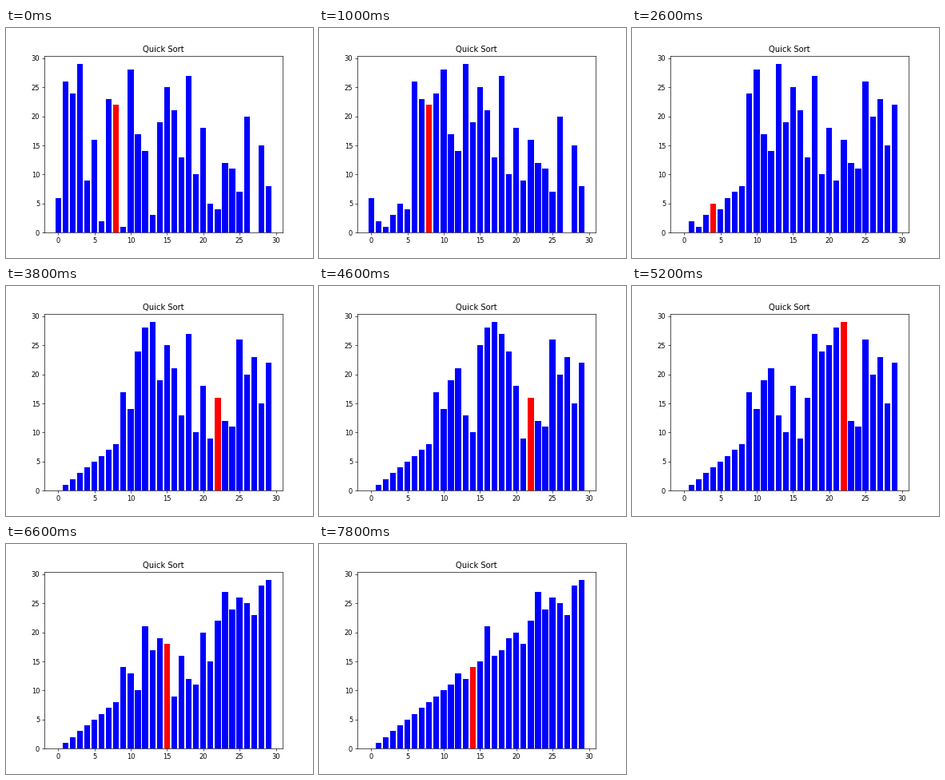
A matplotlib script that plays this animation: 384 by 288 pixels, repeating every 8000 ms.

```python
import matplotlib.pyplot as plt
from matplotlib.animation import FuncAnimation

# The shuffled input; every later state follows from sorting it.
START = [6, 26, 24, 29, 9, 16, 2, 23, 22, 1, 28, 17, 14, 3, 19,
         25, 21, 13, 27, 10, 18, 5, 4, 12, 11, 7, 20, 0, 15, 8]
FRAMES = 40
STEP_MS = 200


def quick_sort(values, low, high):
    """Yield (values, pivot slot) after every exchange in the partition loop."""
    if low >= high:
        return
    pivot = values[high]
    slot = low + sum(v < pivot for v in values[low:high])
    i = low
    for j in range(low, high):
        if values[j] < pivot:
            values[i], values[j] = values[j], values[i]
            i += 1
            yield values[:], slot
    values[i], values[high] = values[high], values[i]
    yield from quick_sort(values, low, i - 1)
    yield from quick_sort(values, i + 1, high)


steps = list(quick_sort(START[:], 0, len(START) - 1))[:FRAMES]

fig, ax = plt.subplots(figsize=(6.4, 4.8), dpi=60)
ax.set_title("Quick Sort")
bars = ax.bar(range(len(START)), START, color="blue")


def draw(frame):
    values, slot = steps[frame]
    for k, (bar, value) in enumerate(zip(bars, values)):
        bar.set_height(value)
        bar.set_facecolor("red" if k == slot else "blue")
    return list(bars)


anim = FuncAnimation(fig, draw, frames=FRAMES, interval=STEP_MS,
                     init_func=lambda: draw(0), repeat=True, repeat_delay=0)
plt.show()
```
